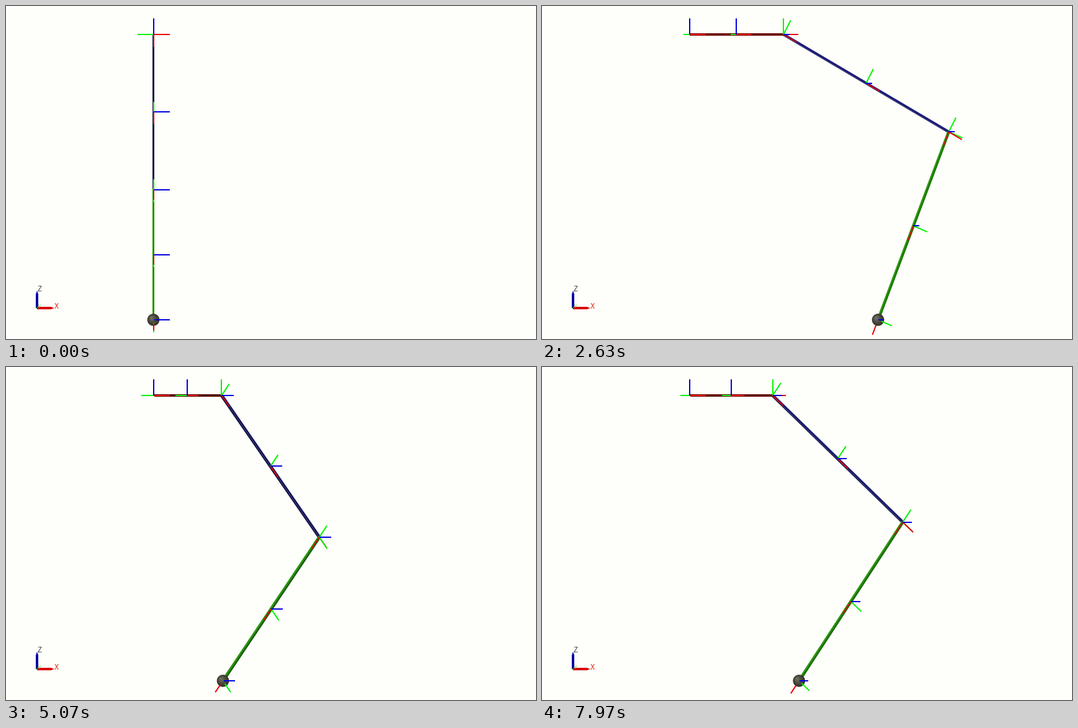
Write a matplotlib script that moves like this. It is 854 px wide and 538 px high and loops after 8 s.

```python
import numpy as np
import matplotlib.pyplot as plt
from matplotlib.animation import FuncAnimation
from matplotlib.patches import Circle, Polygon

W, H, DPI = 854, 538, 64
PT = 72 / DPI                      # points per pixel
STEP, LOOP = 20, 8000              # ms
BASE = (237.5, 46)
HIP, LEG = 163.7, 327.6            # link lengths
DROP, DEPTH = 461, 123.6           # foot below and behind the base
AXIS, THICK = 26, 3.7
RED, GREEN, BLUE = "#ec0000", "#00f400", "#0000e0"
UP = np.array([0.0, 0.0, 1.0])

fig = plt.figure(figsize=(W / DPI, H / DPI), dpi=DPI, facecolor="#fefefa")
ax = fig.add_axes([0, 0, 1, 1])
ax.set_xlim(0, W)
ax.set_ylim(H, 0)
ax.axis("off")


def rgb(r, g, b, k=1.0):
    return tuple(np.clip(np.array([r, g, b]) * k / 255, 0, 1))


def project(p):
    return BASE[0] + p[0], BASE[1] - p[2]


def stroke(color, width=2):
    return ax.plot([], [], color=color, lw=width * PT,
                   solid_capstyle="butt")[0]


class Link:
    """Square bar showing its side face and its lower or rear face."""

    def __init__(self, side, rear, z):
        self.side, self.rear = side, rear
        self.faces = [Polygon(np.zeros((4, 2)), lw=0, zorder=z + i / 2)
                      for i in range(2)]
        for face in self.faces:
            ax.add_patch(face)

    def place(self, a, b, g, h, light):
        g, h = g * THICK / 2, h * THICK / 2
        for face, out, across in zip(self.faces, (-g, h), (h, g)):
            corners = [a + out - across, a + out + across,
                       b + out + across, b + out - across]
            face.set_xy([project(c) for c in corners])
        self.faces[0].set_facecolor(rgb(*self.rear))
        self.faces[1].set_facecolor(rgb(*self.side, 0.1 + 0.97 * light))


class Triad:
    def __init__(self, starts=(0, 0, 0), red_alpha=1.0):
        self.starts = starts
        self.lines = [stroke(c) for c in (RED, GREEN, BLUE)]
        self.lines[0].set_alpha(red_alpha)

    def place(self, origin, axes):
        for line, axis, start in zip(self.lines, axes, self.starts):
            a, b = origin + AXIS * start * axis, origin + AXIS * axis
            line.set_data(*zip(project(a), project(b)))
            line.set_zorder(1000 - (a[1] + b[1]) / 2)


class Ball:
    def __init__(self, radius=9.8, rings=7):
        self.rings = []
        dark, lit = np.array([54, 52, 40]), np.array([124, 122, 108])
        for i in range(rings):
            k = i / rings
            disc = Circle((0, 0), radius * (1 - k), lw=0, zorder=10 + i / 10,
                          facecolor=rgb(*(dark + (lit - dark) * k)))
            self.rings.append((disc, 4 * k))
            ax.add_patch(disc)

    def place(self, p):
        x, y = project(p)
        for disc, shift in self.rings:
            disc.center = (x - shift, y - shift)


def draw_compass():
    ax.plot([50, 50], [488, 465], color="#0000a0", lw=4 * PT,
            solid_capstyle="butt")
    ax.add_patch(Polygon([(48, 466), (52, 466), (50, 460)], color="#0000a0",
                         lw=0))
    ax.plot([50, 73], [488, 488], color="#d80000", lw=4 * PT,
            solid_capstyle="butt")
    ax.add_patch(Polygon([(72, 486), (72, 490), (78, 488)], color="#d80000",
                         lw=0))
    ax.add_patch(Circle((50.5, 487.5), 1.6, color="#109000", lw=0, zorder=4))
    for x, y, label, color, size in ((54, 456.5, "Z", "#404048", 12),
                                     (81.5, 484.5, "X", "#e03010", 12),
                                     (54, 484, "y", "#70e020", 8)):
        ax.text(x, y, label, color=color, fontsize=size * PT, ha="center",
                va="center_baseline", family="Liberation Mono")


draw_compass()
links = [Link((112, 12, 0), (60, 6, 0), 3),
         Link((28, 28, 122), (18, 18, 66), 1),
         Link((26, 126, 2), (34, 150, 0), 2)]
ball = Ball()
world, base, mid_hip, hip_fixed = (Triad() for _ in range(4))
hip, mid_upper, knee_fixed = Triad(red_alpha=0.85), Triad(red_alpha=0.9), Triad()
knee, mid_lower = Triad(red_alpha=0.8), Triad(red_alpha=0.85)
foot = Triad(starts=(0.37, 0.25, 0.05))


def update(k):
    t = k * STEP + STEP // 2
    n = (3 * t + 10) // 100                     # 30 poses a second
    phase = max(n - 1, 0) / 30
    x = HIP * (1 - np.cos(phase))

    # Inverse kinematics: yaw at the base, then a two-link leg.
    reach = np.hypot(x, DEPTH)
    u = np.array([x, DEPTH, 0]) / reach
    h = np.array([u[1], -u[0], 0])
    a = reach - HIP
    bend = np.arccos(np.hypot(a, DROP) / (2 * LEG))
    aim = np.arctan2(-DROP, a)

    def turned(angle):
        c, s = np.cos(angle), np.sin(angle)
        return c * u + s * UP, c * UP - s * u, h

    upper, lower = turned(aim + bend), turned(aim - bend)
    p0 = np.zeros(3)
    p1 = HIP * u
    p2 = p1 + LEG * upper[0]
    p3 = p2 + LEG * lower[0]

    links[0].place(p0, p1, UP, h, u[0])
    links[1].place(p1, p2, upper[1], h, u[0])
    links[2].place(p2, p3, lower[1], h, u[0])
    ball.place(p3)

    yaw = (u, -h, UP)
    world.place(p0, np.eye(3))
    base.place(p0, yaw)
    mid_hip.place(p1 / 2, yaw)
    hip_fixed.place(p1, (u, UP, h))
    hip.place(p1, upper)
    mid_upper.place((p1 + p2) / 2, upper)
    knee_fixed.place(p2, upper)
    knee.place(p2, lower)
    mid_lower.place((p2 + p3) / 2, lower)
    foot.place(p3, lower)
    return []


anim = FuncAnimation(fig, update, frames=LOOP // STEP, interval=STEP,
                     init_func=lambda: update(0), repeat=True, repeat_delay=0)
plt.show()
```
